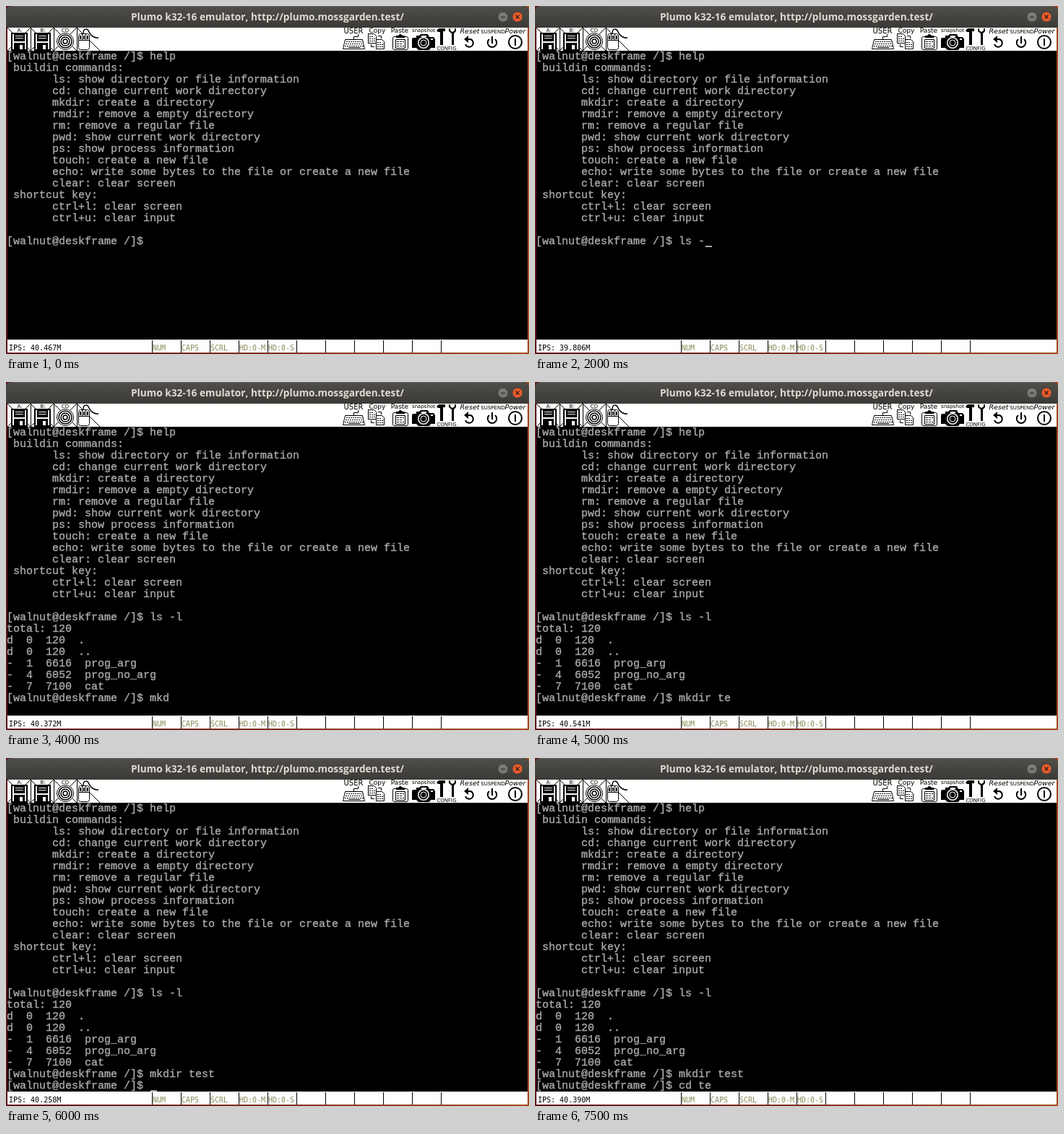
Animation, 724 px wide and 482 px high, one loop 8 s. Source, as an HTML page:

```html
<!DOCTYPE html>
<html lang="en">
<head>
<meta charset="utf-8">
<title>Terminal session</title>
<style>
  html, body { margin: 0; width: 100%; height: 100%; overflow: hidden; background: #000; }
  svg { display: block; width: 724px; height: 482px; }
  text { white-space: pre; }
  .title { font: 700 13.7px "Open Sans", "Noto Sans", sans-serif; fill: #dfdbd2; text-anchor: middle; }
  .term { font: 15px "Liberation Mono", monospace; fill: #a8a8a8; stroke: #a8a8a8; stroke-width: .4px; }
  .status { font: 10px "DejaVu Sans Mono", monospace; fill: #000; }
  .off { fill: #8a8a5c; }
  .cap { font: 9px "DejaVu Sans", sans-serif; text-anchor: middle; fill: #000; }
  .cap .small { font-size: 7px; }
  .cap .wide { font-size: 10px; }
  .cap .slant { font-style: italic; font-size: 9.5px; }
  .line { fill: none; stroke: #000; }
</style>
</head>
<body>
<svg viewBox="0 0 724 482">
  <defs>
    <linearGradient id="desk"><stop stop-color="#5c1420"/><stop offset="1" stop-color="#a8461e"/></linearGradient>
    <linearGradient id="bar" x2="0" y2="1"><stop stop-color="#504e48"/><stop offset="1" stop-color="#3b3a36"/></linearGradient>
    <g id="floppy">
      <path class="line" d="M0 0L32 32M32 0L0 32M32 0V32"/>
      <rect x="5" y="7" width="23" height="25"/>
      <path fill="#fff" d="M7 9H9V30H7ZM24 9H26V30H24ZM11 11H22V12H11ZM11 14H22V15H11ZM9 19H24V21H9ZM17 24H21V30H17Z"/>
    </g>
    <g id="sheet">
      <path fill="#fff" stroke="#000" d="M.5 .5H8.5L11.5 3.5V13.5H.5Z"/>
      <path class="line" d="M2 4.5H7M2 7.5H10M2 10.5H10" stroke-dasharray="2 1"/>
    </g>
  </defs>

  <rect width="724" height="482" fill="url(#desk)"/>
  <path fill="url(#bar)" d="M0 30V8Q0 0 8 0H716Q724 0 724 8V30Z"/>
  <path stroke="#66645d" d="M8 .5H716"/>
  <text class="title" x="362" y="20">Plumo k32-16 emulator, http://plumo.mossgarden.test/</text>
  <circle cx="688" cy="15" r="7" fill="#7b7a73" stroke="#45433d"/>
  <path stroke="#32312d" stroke-width="1.5" d="M685 15.5H691"/>
  <circle cx="708" cy="15" r="7" fill="#ee5b2d" stroke="#45433d"/>
  <path stroke="#3b2018" stroke-width="1.5" d="M705.5 12.5L710.5 17.5M710.5 12.5L705.5 17.5"/>

  <rect x="2" y="30" width="720" height="32" fill="#fff"/>
  <g shape-rendering="crispEdges">
    <use href="#floppy" x="2" y="30"/>
    <use href="#floppy" x="34" y="30"/>
  </g>
  <g class="line">
    <path d="M66 30L98 62M98 30L66 62M98.5 30V62M98 30L130 62"/>
    <circle cx="82" cy="49" r="11.5" fill="#fff"/>
    <circle cx="82" cy="49" r="9" stroke-width="1.5"/>
    <circle cx="82" cy="49" r="6" stroke-width="1.5"/>
    <circle cx="82" cy="49" r="3" stroke-width="1.5"/>
    <path stroke-width="1.5" d="M107 38C107 30 113 31 115 36S123 45 128 44"/>
    <rect x="100.5" y="38.5" width="15" height="22" rx="3" fill="#fff"/>
    <path d="M101 47.5H115M105.5 39V47M110.5 39V47"/>
    <path stroke-width="2" d="M103 41V46M108 41V46M113 41V46"/>
  </g>
  <path fill="#fff" d="M11 30H27V37H11ZM43 30H59V37H43ZM75 30H90V37H75Z"/>
  <g class="cap">
    <text class="small" x="19" y="36">A:</text>
    <text class="small" x="51" y="36">B:</text>
    <text class="small" x="82" y="36">CD</text>
    <text class="wide" x="481" y="38">USER</text>
    <text x="514" y="37">Copy</text>
    <text x="545" y="37">Paste</text>
    <text class="small" x="578" y="36">snapshot</text>
    <text class="small" x="610" y="61">CONFIG</text>
    <text class="slant" x="642" y="38">Reset</text>
    <text class="small" x="674" y="38">SUSPEND</text>
    <text class="slant" x="705" y="38">Power</text>
  </g>

  <path class="line" d="M481.5 46V42.5H487.5V39"/>
  <path class="line" fill="#ddd" d="M469.5 46.5H493.5L496.5 59.5H466.5Z"/>
  <path class="line" stroke-dasharray="2 1" d="M471 49.5H493M470 52.5H494M469 55.5H495"/>
  <path class="line" d="M474 57.5H490"/>
  <use href="#sheet" x="501" y="38"/>
  <use href="#sheet" x="512" y="46"/>
  <path class="line" d="M515 41.5H519.5V45M505.5 53V56.5H510"/>
  <rect class="line" x="535.5" y="42.5" width="21" height="18" rx="2" fill="#fff"/>
  <path d="M540 44V41H543Q545.5 37 549 41H552V44Z"/>
  <path class="line" d="M539.5 46.5H552.5V58.5H539.5Z"/>
  <path class="line" stroke-dasharray="3 1" d="M541 49.5H551M541 52.5H549M541 55.5H551"/>
  <path d="M563 44H568V41H572L574 39H584L586 43H592L594 46V58H588L586 61H571L568 58H562V46Z"/>
  <circle cx="578" cy="51" r="8" fill="#fff"/>
  <circle cx="578" cy="51" r="6.5"/>
  <circle cx="578" cy="51" r="4" fill="none" stroke="#fff"/>
  <path fill="#fff" d="M575 41H582V43H575ZM588 45H591V47H588Z"/>
  <path d="M596 34L599 31H608V35H605V54H601V36H598ZM613 31V35L617 38V54H620V38L623 35V31H621V34L618 36L615 34V31Z"/>
  <g class="line" stroke-width="2">
    <path d="M637 46H643A5.5 5.5 0 1 1 636 53"/>
    <path d="M669 46A6.2 6.2 0 1 0 677 46M673 42V52"/>
    <circle cx="705" cy="50" r="9"/>
    <path d="M705 45V55"/>
  </g>
  <path d="M634 46L640 41V51Z"/>

  <rect x="2" y="62" width="720" height="400"/>
  <g id="screen" class="term"></g>
  <rect id="cursor" width="9" height="2" fill="#a8a8a8"/>
  <rect x="2" y="462" width="720" height="18" fill="#fff"/>
  <g id="status" class="status"><text id="ips" x="4" y="477"></text></g>
</svg>
<script>
const $ = id => document.getElementById(id);
const LOOP = 8000, ROWS = 25, CELL = { w: 9, h: 16, x: 2, y: 62 };
const PROMPT = "[walnut@deskframe /]$ ";

const helpText = ` buildin commands:
       ls: show directory or file information
       cd: change current work directory
       mkdir: create a directory
       rmdir: remove a empty directory
       rm: remove a regular file
       pwd: show current work directory
       ps: show process information
       touch: create a new file
       echo: write some bytes to the file or create a new file
       clear: clear screen
 shortcut key:
       ctrl+l: clear screen
       ctrl+u: clear input
`.split("\n");

const listing = `total: 120
d  0  120  .
d  0  120  ..
-  1  6616  prog_arg
-  4  6052  prog_no_arg
-  7  7100  cat`.split("\n");

const start = [PROMPT + "help", ...helpText];
const listed = [...start, PROMPT + "ls -l", ...listing];
const made = [...listed, PROMPT + "mkdir test"];

// Each step: time, finished lines, current input, cursor shown
const steps = [
  [0, start, "", false],
  [1500, start, "l", false],
  [2000, start, "ls -", true],
  [2500, listed, "", false],
  [4000, listed, "mkd", false],
  [4500, listed, "mkdir ", false],
  [5000, listed, "mkdir te", false],
  [5500, listed, "mkdir test", false],
  [6000, made, "", true],
  [6500, made, "cd", false],
  [7500, made, "cd te", false]
];

const speeds = [
  [0, "40.467"], [1500, "39.806"], [2500, "40.606"], [3500, "40.372"],
  [4500, "40.541"], [5500, "40.258"], [6500, "41.027"], [7500, "40.390"]
];

function add(parent, tag, attrs, text = "") {
  const node = document.createElementNS("http://www.w3.org/2000/svg", tag);
  for (const key in attrs) node.setAttribute(key, attrs[key]);
  node.textContent = text;
  return parent.appendChild(node);
}

// Glyphs sit one pixel left of their cells to offset the font's side bearing
const rows = Array.from({ length: ROWS }, (_, i) =>
  add($("screen"), "text", { x: CELL.x - 1, y: CELL.y + i * CELL.h + 12 }));

const labels = ["NUM", "CAPS", "SCRL", "HD:0-M", "HD:0-S"];
for (let i = 0; i < 11; i++) {
  const x = 202 + i * 40;
  add($("status"), "rect", { x, y: 463, width: 1, height: 17 });
  if (labels[i]) add($("status"), "text", { x: x + 1, y: 477, class: "off" }, labels[i]);
}

const latest = (list, t) => list.findLast(([time]) => time <= t);

function render(t) {
  const [, done, input, showCursor] = latest(steps, t);
  const lines = [...done, PROMPT + input];
  rows.forEach((row, i) => {
    const line = lines[i] || "";
    if (row.textContent !== line) row.textContent = line;
  });
  const cursor = $("cursor");
  cursor.setAttribute("x", CELL.x + (PROMPT + input).length * CELL.w);
  cursor.setAttribute("y", CELL.y + done.length * CELL.h + 14);
  cursor.setAttribute("visibility", showCursor ? "visible" : "hidden");
  $("ips").textContent = `IPS: ${latest(speeds, t)[1]}M`;
}

const began = performance.now();
function tick() {
  render((performance.now() - began) % LOOP);
  requestAnimationFrame(tick);
}
tick();
</script>
</body>
</html>
```
